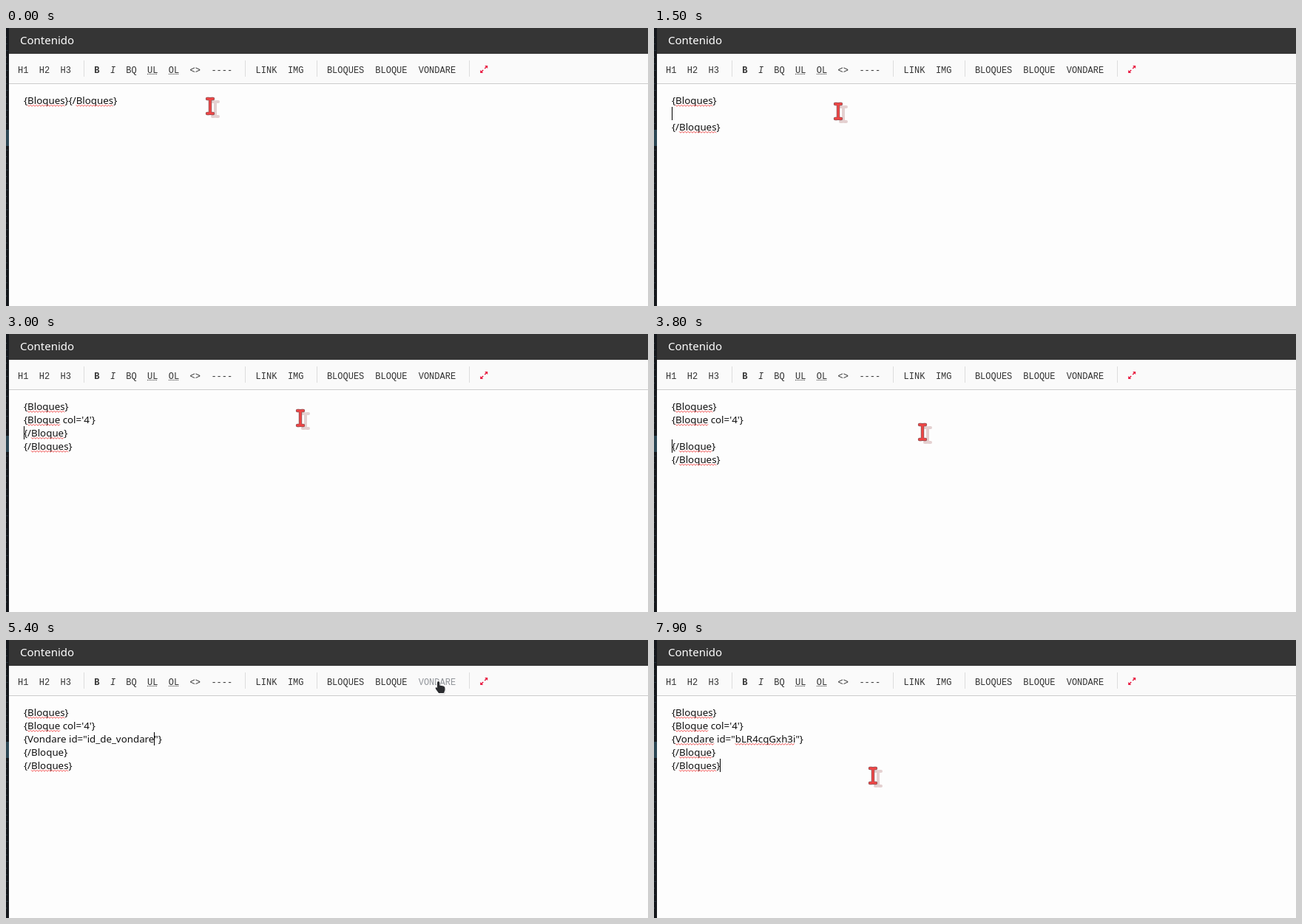
Write an HTML page with a canvas that moves like this. It is 868 px wide and 377 px high and loops after 8000 ms.

```html
<!DOCTYPE html>
<html lang="es">
<head>
<meta charset="utf-8">
<style>
  html, body { margin: 0; width: 100%; height: 100%; overflow: hidden; }
  canvas { display: block; }
</style>
</head>
<body>
<canvas id="stage" width="868" height="377"></canvas>
<script>
const ctx = document.getElementById('stage').getContext('2d');
const LOOP = 8000, LEFT = 24, TOP = 89, ROW = 18, BLINK = 600;
const SANS = '13.333px "Noto Sans", "Open Sans", sans-serif';
const MONO = '12px "Liberation Mono", monospace';

const buttons = [
  ['H1', 16], ['H2', 44.8], ['H3', 73.6], ['B', 119.3, 'bold '], ['I', 140.9, 'italic '],
  ['BQ', 162.3], ['UL', 191], ['OL', 219.8], ['<>', 248.6], ['----', 277.4],
  ['LINK', 337.6], ['IMG', 380.9], ['BLOQUES', 433.9], ['BLOQUE', 499.3], ['VONDARE', 557.7]
];

// Mouse path: time, x, y
const path = [
  [0, 276, 106], [100, 277, 105], [300, 284, 100], [500, 290, 102], [700, 290, 102],
  [1300, 250, 116], [1400, 250, 116], [1500, 249, 113], [2300, 520, 57], [2400, 520, 57],
  [3000, 398, 114], [3200, 398, 114], [4000, 357, 136], [4100, 357, 136], [4200, 357, 137],
  [4300, 357, 137], [5200, 586, 63], [5400, 587, 64], [6100, 229, 129], [6300, 178, 135],
  [6800, 178, 135], [7000, 296, 184], [8000, 296, 184]
];

// Editor states: time, text ("|" is the caret), misspelled words, selected word
const ALL = /\w{6,}/g, STALE = /Bloques|(?<=\{)Bloque/g;
const open = '{Bloques}\n', block = open + "{Bloque col='4'}";
const end = '\n{/Bloque}\n{/Bloques}';
const video = id => block + '\n{Vondare id="' + id + '"}' + end;
const states = [
  [0, '{Bloques}{/Bloques}', ALL],
  [100, '{Bloques}|{/Bloques}', ALL],
  [300, open + '|{/Bloques}', ALL],
  [1000, open + '\n|{/Bloques}', ALL],
  [1200, open + '|\n{/Bloques}', ALL],
  [2400, block + '|{/Bloque}\n{/Bloques}', ALL],
  [2900, block + '\n|{/Bloque}\n{/Bloques}', ALL],
  [3600, block + '\n\n|{/Bloque}\n{/Bloques}', ALL],
  [4200, block + '\n|' + end, ALL],
  [5300, video('id_de_vondare|'), STALE],
  [6500, video('id_de_vond|are'), ALL],
  [6700, video('id_de_vondare'), ALL, 'id_de_vondare'],
  [7000, video('bLR4cqGxh3i|'), ALL],
  [7900, video('bLR4cqGxh3i') + '|', ALL]
];

function rect(x, y, w, h, color) {
  ctx.fillStyle = color;
  ctx.fillRect(x, y, w, h);
}

function label(text, x, y, font, color) {
  ctx.font = font;
  ctx.fillStyle = color;
  ctx.fillText(text, x, y);
}

function mouseAt(t) {
  const i = path.findIndex(p => p[0] > t);
  const [t0, x0, y0] = path[i - 1], [t1, x1, y1] = path[i];
  let k = (t - t0) / (t1 - t0);
  if (t1 - t0 > 400) k = k * k * (3 - 2 * k);
  return { x: Math.round(x0 + (x1 - x0) * k), y: Math.round(y0 + (y1 - y0) * k) };
}

function drawFrame() {
  rect(0, 0, 868, 377, '#fdfdfd');
  rect(0, 0, 4, 377, '#15181c');
  for (let i = 0; i < 40; i++)
    rect(0, 12 + i * 9, 1 + i * 7 % 3, 1, i % 3 ? '#24313a' : '#30424b');
  rect(0, 138, 4, 22, '#2b4653');
  rect(4, 0, 864, 35, '#353535');
  label('Contenido', 19, 22, '15px "Noto Sans", "Open Sans", sans-serif', '#fff');
  rect(4, 35, 864, 40, '#fafafa');
  rect(4, 75, 864, 1, '#ccc');
}

function drawToolbar(mouse) {
  for (const [text, x, style = ''] of buttons) {
    const width = text.length * 7.2;
    const hover = mouse.y < 75 && mouse.x >= x && mouse.x <= x + width;
    label(text, x, 61, style + MONO, hover ? '#92969b' : '#333');
    if (text === 'UL' || text === 'OL')
      for (let i = 0; i < 14; i += 2) rect(Math.round(x) + i, 62, 1, 1, '#333');
  }
  for (const x of [105, 323, 420, 626]) rect(x, 44, 1, 22, '#ddd');

  ctx.fillStyle = ctx.strokeStyle = '#e8173f';
  ctx.lineWidth = 1.5;
  for (const s of [1, -1]) {
    ctx.save();
    ctx.translate(646.2, 56);
    ctx.scale(s, s);
    ctx.fill(new Path2D('M5 -5V-1L1 -5Z'));
    ctx.stroke(new Path2D('M1 -1L4 -4'));
    ctx.restore();
  }
}

function squiggle(x, y, width) {
  ctx.beginPath();
  for (let i = 0; i <= width; i += 2) ctx.lineTo(x + i, y + (i % 4 ? 1 : -1));
  ctx.strokeStyle = '#f03a3a';
  ctx.lineWidth = 0.9;
  ctx.stroke();
}

function drawEditor(t) {
  const [since, text, spelling, selected] = states.findLast(s => s[0] <= t);
  const caretOn = Math.floor((t - since) / BLINK) % 2 === 0;
  ctx.font = SANS;
  const widthOf = s => ctx.measureText(s).width;
  text.split('\n').forEach((raw, row) => {
    const line = raw.replace('|', ''), y = TOP + row * ROW, base = y + 14;
    label(line, LEFT, base, SANS, '#111');
    for (const m of line.matchAll(spelling))
      squiggle(LEFT + widthOf(line.slice(0, m.index)), base + 2.3, widthOf(m[0]));
    const at = selected ? line.indexOf(selected) : -1;
    if (at >= 0) {
      const x = LEFT + widthOf(line.slice(0, at));
      rect(Math.round(x), y, Math.round(widthOf(selected)), ROW, '#3daee9');
      label(selected, x, base, SANS, '#fff');
    }
    const caret = raw.indexOf('|');
    if (caret >= 0 && caretOn)
      rect(Math.floor(LEFT + widthOf(raw.slice(0, caret))), y, 1, ROW, '#000');
  });
}

const beam = new Path2D('M-4 -10H-2Q0 -10 0 -8V8Q0 10 -2 10H-4M4 -10H2Q0 -10 0 -8V8Q0 10 2 10H4');
const hand = new Path2D('M-4 -6Q-4 -8 -2.3 -8Q-.7 -8 -.7 -6V-2.5L4.5 -1.5Q6.5 -1 6.5 1V4L5 8H-2L-6 2.5Q-7 .5 -5.5 0L-4 1Z');

function strokeBeam(color, width) {
  ctx.strokeStyle = color;
  ctx.lineWidth = width;
  ctx.stroke(beam);
}

function drawMouse({ x, y }) {
  ctx.save();
  ctx.lineJoin = ctx.lineCap = 'round';
  ctx.translate(x, y);
  if (y < 75) {
    ctx.translate(1, 1.5);
    ctx.fillStyle = 'rgba(0,0,0,.2)';
    ctx.fill(hand);
    ctx.translate(-1, -1.5);
    ctx.strokeStyle = '#fff';
    ctx.lineWidth = 2;
    ctx.stroke(hand);
    ctx.fillStyle = '#2b2d30';
    ctx.fill(hand);
  } else {
    ctx.translate(7, 4);
    strokeBeam('rgba(190,140,140,.4)', 4);
    ctx.translate(-7, -4);
    strokeBeam('#8c5558', 4.4);
    strokeBeam('#f04545', 2.8);
  }
  ctx.restore();
}

function draw(now) {
  const t = Math.floor(now % LOOP / 100) * 100;
  const mouse = mouseAt(t);
  drawFrame();
  drawToolbar(mouse);
  drawEditor(t);
  drawMouse(mouse);
  requestAnimationFrame(draw);
}
requestAnimationFrame(draw);
</script>
</body>
</html>
```
